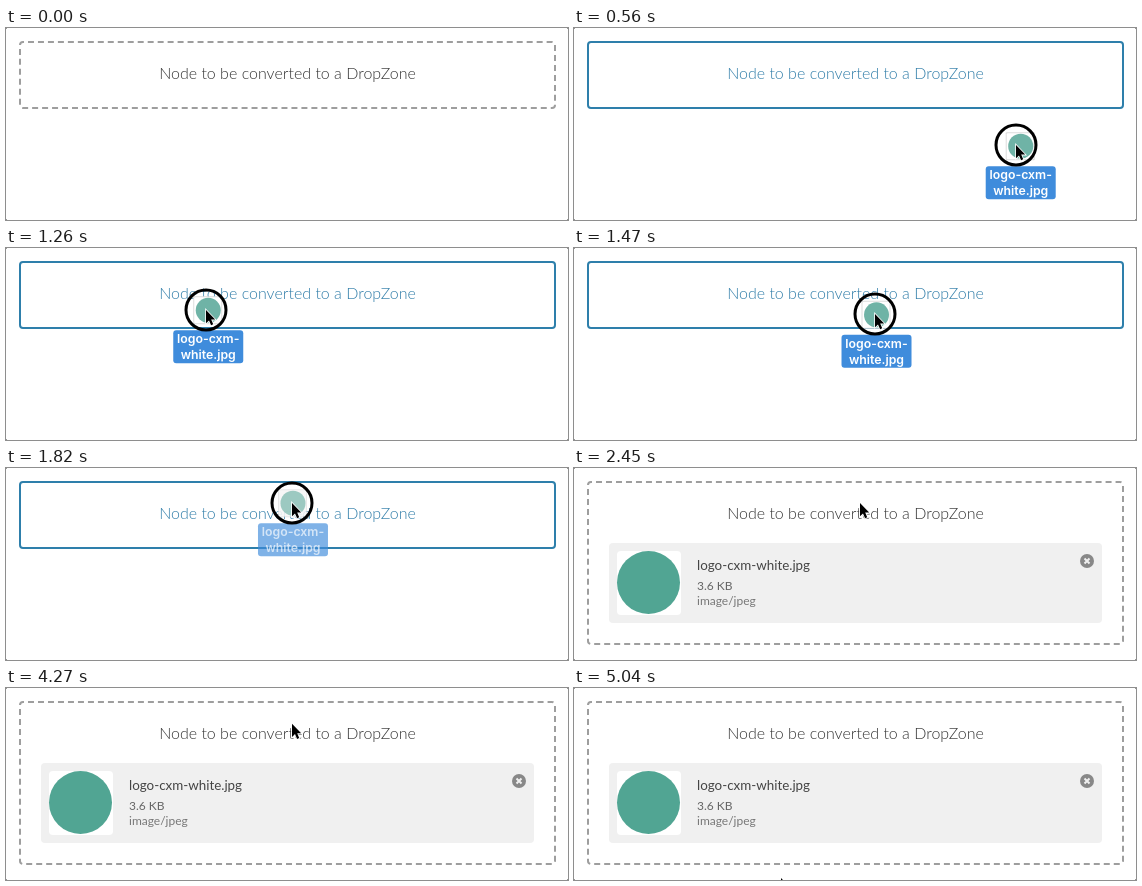
An HTML page with a canvas for the animation above (5.11 s loop, 562x192 px).

```html
<!DOCTYPE html>
<html lang="en">
<head>
<meta charset="utf-8">
<title>Drop zone</title>
<style>
html, body { margin: 0; width: 100%; height: 100%; overflow: hidden; background: #fff; }
canvas { display: block; }
</style>
</head>
<body>
<canvas id="stage" width="562" height="192"></canvas>
<script>
const LOOP = 5110, STEP = 70, DROP = 2100;
const ctx = document.getElementById('stage').getContext('2d');
const TEAL = '#51a593';

// [time, x, y] of the pointer
const dragPath = [
  [70, 566, 119], [280, 520, 121], [420, 476, 120], [560, 442, 117],
  [770, 303, 65], [980, 399, 113], [1050, 402, 114], [1120, 377, 109],
  [1260, 200, 62], [1400, 304, 70], [1470, 301, 66], [1680, 286, 39], [1820, 286, 35]
];
const leavePath = [
  [4200, 286, 35], [4480, 286, 38], [4760, 286, 44], [4830, 298, 70],
  [4900, 290, 110], [4970, 250, 155], [5040, 207, 190]
];

const clamp = v => Math.max(0, Math.min(1, v));
const mix = (a, b, k) => `rgb(${a.map((v, i) => Math.round(v + (b[i] - v) * k))})`;

// Cubic Hermite through time-stamped points
function along(path, t) {
  const last = path.length - 1;
  if (t <= path[0][0]) return path[0].slice(1);
  if (t >= path[last][0]) return path[last].slice(1);
  const i = path.findIndex(p => p[0] > t) - 1;
  const a = path[i], b = path[i + 1], span = b[0] - a[0], u = (t - a[0]) / span;
  const slope = (n, c) => {
    const p = path[Math.max(0, n - 1)], q = path[Math.min(last, n + 1)], m = path[n];
    return (m[c] - p[c]) * (q[c] - m[c]) < 0 ? 0 : (q[c] - p[c]) / (q[0] - p[0]);
  };
  return [1, 2].map(c =>
    a[c] * (1 + 2 * u) * (1 - u) ** 2 + b[c] * u * u * (3 - 2 * u) +
    span * u * (1 - u) * (slope(i, c) * (1 - u) - slope(i + 1, c) * u));
}

function box(x, y, w, h, r, fill) {
  ctx.fillStyle = fill;
  ctx.beginPath();
  ctx.roundRect(x, y, w, h, r);
  ctx.fill();
}

function disc(x, y, r, fill) {
  ctx.fillStyle = fill;
  ctx.beginPath();
  ctx.arc(x, y, r, 0, 7);
  ctx.fill();
}

function text(str, x, y, font, fill, align = 'left') {
  ctx.font = font;
  ctx.fillStyle = fill;
  ctx.textAlign = align;
  ctx.fillText(str, x, y);
}

// Dashes are spaced so a whole number fits around the outline
function zone(height, dashed, color) {
  const w = 535, h = height - 2, r = 3, dash = 6;
  const length = 2 * (w + h) - (8 - 2 * Math.PI) * r;
  const pitch = length / Math.round(length / 10);
  ctx.save();
  ctx.strokeStyle = color;
  ctx.lineWidth = 2;
  if (dashed) {
    ctx.setLineDash([dash, pitch - dash]);
    ctx.lineDashOffset = pitch / 2;
  }
  ctx.beginPath();
  ctx.roundRect(14, 14, w, h, r);
  ctx.stroke();
  ctx.restore();
}

function pointer(x, y) {
  ctx.save();
  ctx.translate(x, y);
  const shape = new Path2D('M0 0V13.2L3 10.4L5.1 15.2L7.2 14.3L5.2 9.6H9.2Z');
  ctx.strokeStyle = '#fff';
  ctx.lineWidth = 1.6;
  ctx.stroke(shape);
  ctx.fillStyle = '#000';
  ctx.fill(shape);
  ctx.restore();
}

function ghost(x, y, alpha) {
  ctx.save();
  ctx.globalAlpha = alpha;
  box(x - 15, y - 14, 29, 28, 1, '#ddd');
  box(x - 14, y - 13, 27, 26, 1, '#fff');
  disc(x, y, 12.5, '#6fb3a6');
  box(x - 35, y + 20, 70, 33, 3, '#3f8cdc');
  const font = '600 12.3px Inter, sans-serif';
  text('logo-cxm-', x, y + 33, font, '#fff', 'center');
  text('white.jpg', x, y + 49, font, '#fff', 'center');
  ctx.restore();
}

function ring(x, y) {
  ctx.strokeStyle = '#000';
  ctx.lineWidth = 3;
  ctx.beginPath();
  ctx.arc(x, y, 20, 0, 7);
  ctx.stroke();
}

function card() {
  box(35, 75, 493, 80, 4, '#f0f0f0');
  box(43, 83, 64, 64, 4, '#fff');
  disc(74.5, 114.5, 31.5, TEAL);
  text('logo-cxm-white.jpg', 123, 102, '13.4px Lato, sans-serif', '#444');
  text('3.6 KB', 123, 122, '12px Lato, sans-serif', '#666');
  text('image/jpeg', 123, 137, '12px Lato, sans-serif', '#777');
  disc(513, 93, 7, '#888');
  ctx.strokeStyle = '#f0f0f0';
  ctx.lineWidth = 2;
  ctx.beginPath();
  for (const s of [-1, 1]) {
    ctx.moveTo(510.5, 93 - 2.5 * s);
    ctx.lineTo(515.5, 93 + 2.5 * s);
  }
  ctx.stroke();
}

function corners() {
  ctx.fillStyle = '#999';
  for (const x of [0, 561]) for (const y of [0, 191]) ctx.fillRect(x, y, 1, 1);
}

function draw(t) {
  const dragging = t >= 70 && t < DROP, dropped = t >= DROP;
  const blue = dropped ? 1 - clamp((t - DROP) / 210) : clamp(t / 210);

  ctx.clearRect(0, 0, 562, 192);
  corners();
  zone(dropped ? 164 : 68, !dragging, mix([158, 158, 158], [46, 127, 171], blue));
  text('Node to be converted to a DropZone', 281.5, 51, '300 16px Lato, sans-serif',
    mix([51, 51, 51], [46, 124, 168], blue), 'center');
  if (dropped) card();
  if (t < 70) return;

  const [x, y] = along(dropped ? leavePath : dragPath, t);
  if (dragging && t < 1960) {
    const [gx, gy] = along(dragPath, t - 8);
    ghost(gx + 1, gy, 1 - clamp((t - 1750) / 210));
    if (t < 1890) ring(x, y);
  }
  pointer(x, y);
}

function tick(now) {
  draw(Math.floor(now % LOOP / STEP) * STEP);
  requestAnimationFrame(tick);
}
draw(0);
requestAnimationFrame(tick);
</script>
</body>
</html>
```
